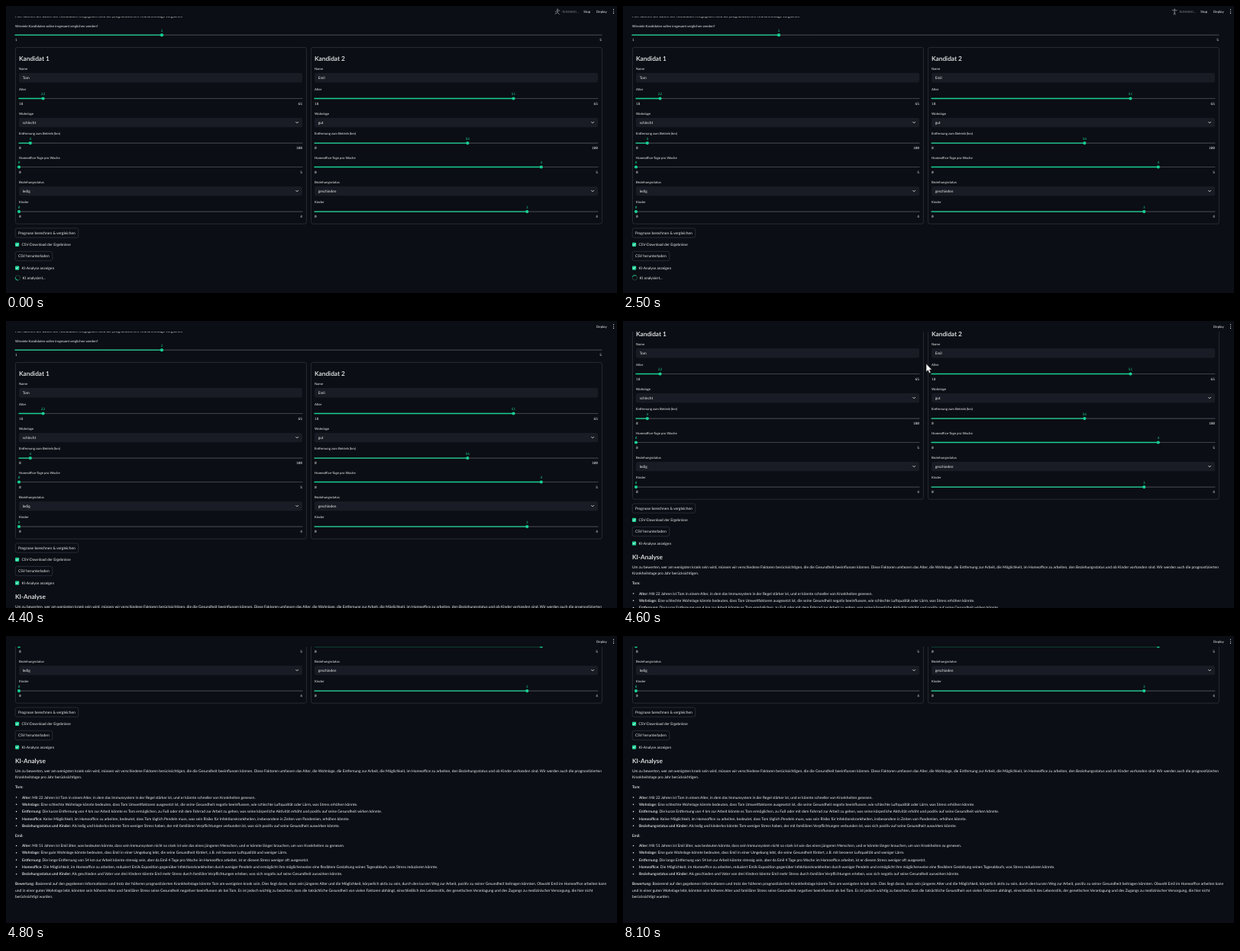
An HTML page for the animation above (8300 ms loop, 800 by 377 pixels).

```html
<!DOCTYPE html>
<html lang="de">
<head>
<meta charset="utf-8">
<title>Kandidatenvergleich</title>
<style>
  html, body { margin: 0; width: 100%; height: 100%; overflow: hidden; background: #0b0e14; }
  svg { display: block; width: 100%; height: 100%; }
  text { font: 4.93px Lato, sans-serif; fill: #f0f1f3; text-rendering: geometricPrecision; white-space: pre; }
  .label { font-size: 4.31px; }
  .check { font-size: 4.82px; }
  .head { font-size: 8.3px; font-weight: 600; }
  .bold { font-weight: 600; }
  .bar { font-size: 4.4px; }
  .busy { font-size: 4px; fill: #80838a; }
  .mono { font: 4.5px "Noto Sans Mono", monospace; }
  .value { fill: #19cf92; }
  .end { text-anchor: end; }
  .mid { text-anchor: middle; }
  .field { fill: #191c24; }
  .frame { fill: none; stroke: #30333b; stroke-width: .8; }
  .line { fill: none; stroke-linecap: round; stroke-linejoin: round; }
</style>
</head>
<body>
<svg id="stage" viewBox="0 0 800 377">
  <defs><clipPath id="view"><rect y="14" width="800" height="363"/></clipPath></defs>
  <rect width="800" height="377" fill="#0b0e14"/>
  <g clip-path="url(#view)"><g id="page"></g></g>
  <g id="bar"></g>
  <path id="cursor" d="M397 56.2v10.6l2.4-2.2 1.7 3.8 1.9-.8-1.7-3.7h3.1z" fill="#fff" stroke="#111" stroke-width=".5"/>
</svg>
<script>
const LOOP = 8300, STEP = 100;
const DONE = 2600;
const SCROLL_START = 4500, SCROLL = [0, 52, 147, 198];
const GREEN = "#19cf92";

const $ = id => document.getElementById(id);
const page = $("page"), bar = $("bar"), cursor = $("cursor");

function add(parent, tag, attrs, content) {
  const el = document.createElementNS("http://www.w3.org/2000/svg", tag);
  for (const key in attrs) el.setAttribute(key, attrs[key]);
  if (content !== undefined) el.textContent = content;
  parent.append(el);
  return el;
}

const text = (parent, x, y, str, cls = "") => add(parent, "text", { x, y, class: cls }, str);

const box = (x, y, width, height, cls, rx = 2) =>
  add(page, "rect", { x, y, width, height, rx, class: cls });

const line = (parent, d, stroke, width) =>
  add(parent, "path", { d, stroke, "stroke-width": width, class: "line" });

function slider(x, width, y, label, low, high, value) {
  const thumb = x + width * (value - low) / (high - low), track = y + 12.3;
  text(page, x, y + 1.6, label, "label");
  line(page, `M${x} ${track}H${x + width}`, "#3f4249", 1.2);
  line(page, `M${x} ${track}H${thumb}`, GREEN, 1.3);
  add(page, "circle", { cx: thumb, cy: track, r: 2.1, fill: GREEN });
  text(page, thumb, y + 7.9, value, "mono value mid");
  text(page, x, y + 20.4, low, "mono");
  text(page, x + width, y + 20.4, high, "mono end");
}

function field(x, y, label, value, isSelect) {
  text(page, x, y + 1.7, label, "label");
  box(x, y + 5.9, 371, 12.3, "field");
  text(page, x + 4.7, y + 13.7, value, "check");
  if (isSelect) line(page, `M${x + 362.6} ${y + 11.3}l1.5 1.5 1.5-1.5`, "#f0f1f3", .8);
}

function card(x, title, p) {
  box(x - 4.6, 54.4, 381, 231.8, "frame", 2.5);
  text(page, x, 71.6, title, "head");
  field(x, 82.2, "Name", p.name);
  slider(x, 371, 109.2, "Alter", 18, 65, p.age);
  field(x, 141, "Wohnlage", p.area, true);
  slider(x, 371, 167.8, "Entfernung zum Betrieb (km)", 0, 100, p.km);
  slider(x, 371, 199.2, "Homeoffice-Tage pro Woche", 0, 5, p.home);
  field(x, 231, "Beziehungsstatus", p.status, true);
  slider(x, 371, 257.8, "Kinder", 0, 4, p.kids);
}

function button(y, width, label) {
  box(12.2, y - 6.1, width, 12.3, "frame", 2.4);
  text(page, 16, y + 1.7, label);
}

function checkbox(y, label) {
  add(page, "rect", { x: 12, y: y - 2.6, width: 5.2, height: 5.2, rx: 1, fill: GREEN });
  line(page, `M13.2 ${y}l1 1.1 1.8-2.2`, "#fff", .8);
  text(page, 20.4, y + 1.7, label, "check");
}

text(page, 12, 15, "Hier können die Daten der Kandidaten eingegeben und die prognostizierten Krankheitstage verglichen");
slider(12, 768, 25.9, "Wieviele Kandidaten sollen insgesamt verglichen werden?", 1, 5, 2);
card(17, "Kandidat 1", { name: "Tom", age: 22, area: "schlecht", km: 4, home: 0, status: "ledig", kids: 0 });
card(404, "Kandidat 2", { name: "Emil", age: 51, area: "gut", km: 54, home: 4, status: "geschieden", kids: 3 });
button(298, 82.6, "Prognose berechnen & vergleichen");
checkbox(313.4, "CSV-Download der Ergebnisse");
button(328.5, 48.6, "CSV herunterladen");
checkbox(344.1, "KI-Analyse anzeigen");

// Waiting state
const spinner = add(page, "g", {});
add(spinner, "circle", { cx: 15.4, cy: 357, r: 3.2, fill: "none", stroke: "#27463f", "stroke-width": .9 });
const arc = line(spinner, "M12.2 357a3.2 3.2 0 0 1 3.2-3.2", GREEN, .9);
text(spinner, 21.6, 358.8, "KI analysiert...");

// Analysis: each line may start with a bold part, closed by "|"
const analysis = add(page, "g", {});

function row(x, y, str) {
  const parts = str.split("|"), el = text(analysis, x, y, "");
  if (parts.length > 1) add(el, "tspan", { class: "bold" }, parts.shift());
  add(el, "tspan", {}, parts[0]);
}

const paragraph = (y, rows) => rows.forEach((str, i) => row(12, y + i * 8.25, str));

const bullets = (y, rows) => rows.forEach((str, i) => {
  const base = y + i * 9.3;
  add(analysis, "circle", { cx: 13.6, cy: base - 1.6, r: .8, fill: "#f0f1f3" });
  row(21, base, str);
});

text(analysis, 12, 365.2, "KI-Analyse", "head");
paragraph(377, [
  "Um zu bewerten, wer am wenigsten krank sein wird, müssen wir verschiedene Faktoren berücksichtigen, die die Gesundheit beeinflussen können. Diese Faktoren umfassen das Alter, die Wohnlage, die Entfernung zur Arbeit, die Möglichkeit, im Homeoffice zu arbeiten, den Beziehungsstatus und ob Kinder vorhanden sind. Wir werden auch die prognostizierten",
  "Krankheitstage pro Jahr berücksichtigen."
]);
paragraph(398.2, ["Tom:|"]);
bullets(411.6, [
  "Alter:| Mit 22 Jahren ist Tom in einem Alter, in dem das Immunsystem in der Regel stärker ist, und er könnte schneller von Krankheiten genesen.",
  "Wohnlage:| Eine schlechte Wohnlage könnte bedeuten, dass Tom Umweltfaktoren ausgesetzt ist, die seine Gesundheit negativ beeinflussen, wie schlechte Luftqualität oder Lärm, was Stress erhöhen könnte.",
  "Entfernung:| Die kurze Entfernung von 4 km zur Arbeit könnte es Tom ermöglichen, zu Fuß oder mit dem Fahrrad zur Arbeit zu gehen, was seine körperliche Aktivität erhöht und positiv auf seine Gesundheit wirken könnte.",
  "Homeoffice:| Keine Möglichkeit, im Homeoffice zu arbeiten, bedeutet, dass Tom täglich Pendeln muss, was sein Risiko für Infektionskrankheiten, insbesondere in Zeiten von Pandemien, erhöhen könnte.",
  "Beziehungsstatus und Kinder:| Als ledig und kinderlos könnte Tom weniger Stress haben, der mit familiären Verpflichtungen verbunden ist, was sich positiv auf seine Gesundheit auswirken könnte."
]);
paragraph(462.1, ["Emil:|"]);
bullets(475.1, [
  "Alter:| Mit 51 Jahren ist Emil älter, was bedeuten könnte, dass sein Immunsystem nicht so stark ist wie das eines jüngeren Menschen, und er könnte länger brauchen, um von Krankheiten zu genesen.",
  "Wohnlage:| Eine gute Wohnlage könnte bedeuten, dass Emil in einer Umgebung lebt, die seine Gesundheit fördert, z.B. mit besserer Luftqualität und weniger Lärm.",
  "Entfernung:| Die lange Entfernung von 54 km zur Arbeit könnte stressig sein, aber da Emil 4 Tage pro Woche im Homeoffice arbeitet, ist er diesem Stress weniger oft ausgesetzt.",
  "Homeoffice:| Die Möglichkeit, im Homeoffice zu arbeiten, reduziert Emils Exposition gegenüber Infektionskrankheiten durch weniger Pendeln und ermöglicht ihm möglicherweise eine flexiblere Gestaltung seines Tagesablaufs, was Stress reduzieren könnte.",
  "Beziehungsstatus und Kinder:| Als geschieden und Vater von drei Kindern könnte Emil mehr Stress durch familiäre Verpflichtungen erleben, was sich negativ auf seine Gesundheit auswirken könnte."
]);
paragraph(525.4, [
  "Bewertung:| Basierend auf den gegebenen Informationen und trotz der höheren prognostizierten Krankheitstage könnte Tom am wenigsten krank sein. Dies liegt daran, dass sein jüngeres Alter und die Möglichkeit, körperlich aktiv zu sein, durch den kurzen Weg zur Arbeit, positiv zu seiner Gesundheit beitragen könnten. Obwohl Emil im Homeoffice arbeiten kann",
  "und in einer guten Wohnlage lebt, könnten sein höheres Alter und familiärer Stress seine Gesundheit negativer beeinflussen als bei Tom. Es ist jedoch wichtig zu beachten, dass die tatsächliche Gesundheit von vielen Faktoren abhängt, einschließlich des Lebensstils, der genetischen Veranlagung und des Zugangs zu medizinischer Versorgung, die hier nicht",
  "berücksichtigt wurden."
]);

// Top bar
text(bar, 773, 8.6, "Deploy", "bar");
for (const cy of [4.6, 7, 9.4]) add(bar, "circle", { cx: 795.5, cy, r: .6, fill: "#f0f1f3" });
const running = add(bar, "g", {});
text(running, 728.4, 8.5, "RUNNING...", "busy");
text(running, 756.3, 8.6, "Stop", "bar");
add(running, "circle", { cx: 722.2, cy: 4.3, r: .9, fill: "#80838a" });
const limbs = line(running, "", "#80838a", .9);

// Hand and foot positions of the small figure
const RUN = [719.4, 7.6, 725, 6.2, 719, 10.4, 724.4, 11];
const STAND = [719.2, 5.6, 725.2, 5.6, 721.2, 11.2, 723.2, 11.2];

function pose(k) {
  const p = RUN.map((v, i) => v + (STAND[i] - v) * k);
  return `M${p[0]} ${p[1]}L722.2 5.9L${p[2]} ${p[3]}M722.2 5.9V8.4M${p[4]} ${p[5]}L722.2 8.4L${p[6]} ${p[7]}`;
}

const show = (el, on) => el.setAttribute("display", on ? "inline" : "none");

function scrollAt(t) {
  if (t < SCROLL_START) return 0;
  return SCROLL[(t - SCROLL_START) / STEP] ?? SCROLL.at(-1);
}

function draw(time) {
  const t = Math.floor((time % LOOP) / STEP) * STEP;
  const busy = t < DONE;
  show(running, busy);
  show(spinner, busy);
  show(analysis, !busy);
  arc.setAttribute("transform", `rotate(${t / 750 * 360 - 90} 15.4 357)`);
  limbs.setAttribute("d", pose((1 - Math.cos(t / 500 * Math.PI)) / 2));
  page.setAttribute("transform", `translate(0 ${-scrollAt(t)})`);
  show(cursor, t >= SCROLL_START && t < SCROLL_START + 3 * STEP);
}

const start = performance.now();
function tick() {
  draw(performance.now() - start);
  requestAnimationFrame(tick);
}
tick();
</script>
</body>
</html>
```
